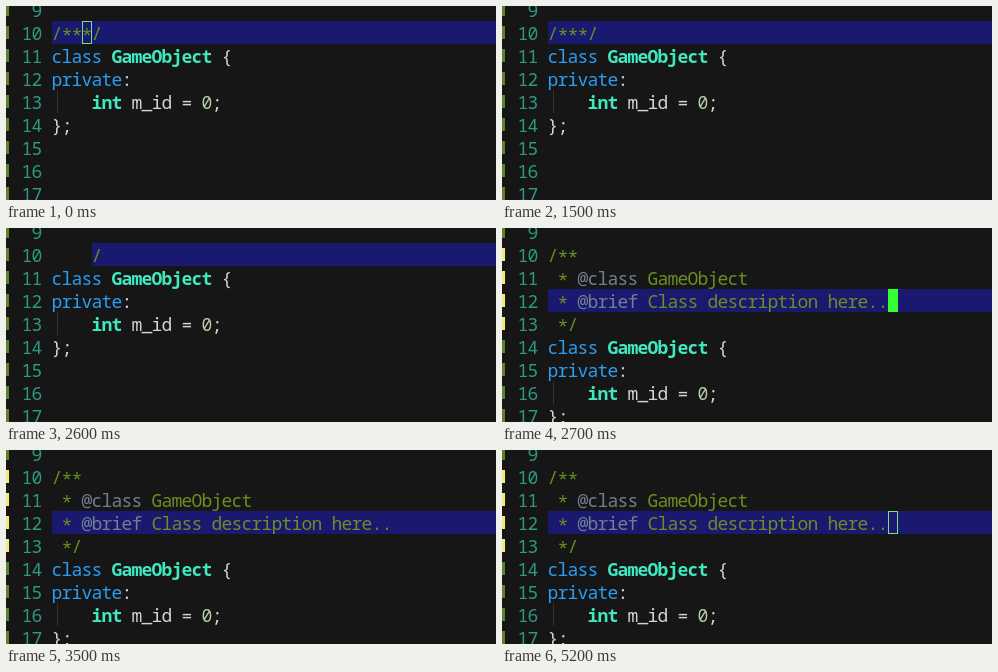
An HTML page with a canvas that plays this animation: 490x194 px, repeating every 5300 ms.

```html
<!DOCTYPE html>
<html lang="en">
<head>
<meta charset="utf-8">
<title>Comment expansion</title>
<style>
html, body { margin: 0; width: 100%; height: 100%; overflow: hidden; background: #161616; }
canvas { display: block; }
</style>
</head>
<body>
<canvas id="stage" width="490" height="194"></canvas>
<script>
const ctx = document.getElementById("stage").getContext("2d");
const LOOP = 5300, CELL = 10, ROW = 23, LEFT = 46, TOP = 15, FIRST = 10, BASELINE = 19;
const C = {
  bg: "#161616", line: "#191970", number: "#2e9882", saved: "#5f7f28", edited: "#f4ec78",
  comment: "#6b8e23", tag: "#708090", keyword: "#2a9df4", type: "#40e8c0",
  plain: "#d4d4d4", digit: "#b5cea8", guide: "#333333", cursor: "#33ff33", hollow: "#7de07d"
};

const classCode = [
  [["class", C.keyword], [" GameObject", C.type], [" {", C.plain]],
  [["private", C.keyword], [":", C.plain]],
  [["    int", C.type], [" m_id = ", C.plain], ["0", C.digit], [";", C.plain]],
  [["};", C.plain]]
];
const comment = text => [text, C.comment];
const star = (tag, text) => [comment(" * "), [tag, C.tag], comment(" " + text)];

const typed = { lines: [[comment("/***/")], ...classCode], active: 10, from: 0, guide: 13 };
const indented = { lines: [[comment("    /")], ...classCode], active: 10, from: 4, guide: 13 };
const expanded = {
  lines: [
    [comment("/**")],
    star("@class", "GameObject"),
    star("@brief", "Class description here.."),
    [comment(" */")],
    ...classCode
  ],
  active: 12, from: 0, guide: 16, edited: [10, 13]
};

const rowTop = n => TOP + (n - FIRST) * ROW;
const colX = c => LEFT + c * CELL;

function rect(color, x, y, w, h) {
  ctx.fillStyle = color;
  ctx.fillRect(x, y, w, h);
}

// Every glyph sits centred in its terminal cell.
function write(text, color, col, n) {
  const weight = color === C.type ? 600 : 500;
  ctx.font = `${weight} 18px "Noto Sans Mono", monospace`;
  ctx.fillStyle = color;
  [...text].forEach((ch, i) => {
    const drop = ch === "*" ? 2 : 0;
    ctx.fillText(ch, colX(col + i) + CELL / 2, rowTop(n) + BASELINE + drop);
  });
}

function drawCursor(style, col, n, under) {
  const x = colX(col), y = rowTop(n);
  if (style === "solid") {
    rect(C.cursor, x, y, CELL, ROW);
    write(under, C.bg, col, n);
  } else if (style === "hollow") {
    ctx.strokeStyle = C.hollow;
    ctx.lineWidth = 1;
    ctx.strokeRect(x + 0.5, y + 0.5, CELL - 1, ROW - 1);
  }
}

// Focused cursor: half a second on, half a second off.
function cursorStyle(t, focus, blur) {
  if (t < focus || t >= blur) return "hollow";
  return (t - focus) % 1000 < 500 ? "solid" : "off";
}

function drawBuffer({ lines, active, from, guide, edited = [0, 0] }) {
  rect(C.bg, 0, 0, 490, 194);
  rect(C.line, colX(from), rowTop(active), 490, ROW);
  rect(C.guide, colX(0) + 5, rowTop(guide), 1, ROW);
  for (let n = 9; n <= 17; n++) {
    const isEdited = n >= edited[0] && n <= edited[1];
    rect(isEdited ? C.edited : C.saved, 0, rowTop(n) + 5, 3, 13);
    write(String(n).padStart(2), C.number, -3, n);
  }
  lines.forEach((spans, i) => {
    let col = 0;
    for (const [text, color] of spans) {
      write(text, color, col, FIRST + i);
      col += text.length;
    }
  });
}

function draw(t) {
  ctx.textAlign = "center";
  ctx.textBaseline = "alphabetic";
  if (t < 2600) {
    drawBuffer(typed);
    drawCursor(cursorStyle(t, 600, LOOP), 3, 10, "*");
  } else if (t < 2700) {
    drawBuffer(indented);
  } else {
    drawBuffer(expanded);
    drawCursor(cursorStyle(t, 2700, 5100), 34, 12, "");
  }
}

const start = performance.now();
function tick() {
  draw((performance.now() - start) % LOOP);
  requestAnimationFrame(tick);
}
tick();
</script>
</body>
</html>
```
